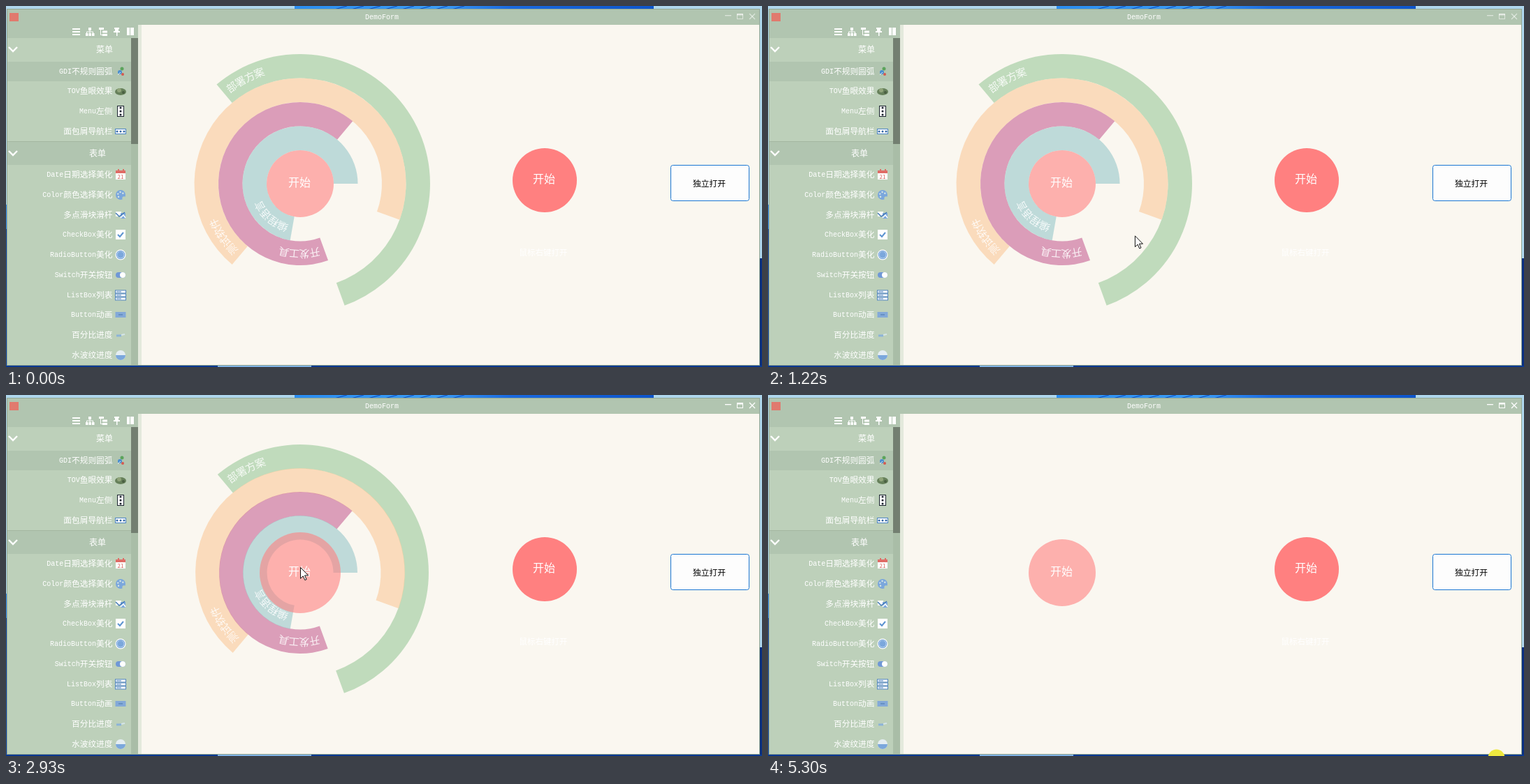
Animation, 1082 px wide and 518 px high, one loop 5350 ms. Source, as an HTML page with a canvas:

```html
<!DOCTYPE html>
<html lang="zh">
<head>
<meta charset="utf-8">
<title>DemoForm</title>
<style>
html, body { margin: 0; width: 100%; height: 100%; overflow: hidden; }
canvas { display: block; }
</style>
</head>
<body>
<canvas id="stage" width="1082" height="518"></canvas>
<script>
const W = 1082, H = 518, LOOP = 5350;
const CJK = '"Noto Sans CJK SC", "Noto Sans CJK", sans-serif';
const MONO = '"Liberation Mono", monospace';
const CREAM = '#faf7f0', SAGE = '#bdd0ba', SAGE_DARK = '#b1c5b0', BLUE = '#7ba7dc';
const stage = document.getElementById('stage').getContext('2d');
const backdrop = document.createElement('canvas');
backdrop.width = W;
backdrop.height = H;
let g = backdrop.getContext('2d');

function box(color, x, y, w, h) {
  g.fillStyle = color;
  g.fillRect(x, y, w, h);
}

function disc(color, x, y, r) {
  g.fillStyle = color;
  g.beginPath();
  g.arc(x, y, r, 0, 7);
  g.fill();
}

function line(color, width, ...pts) {
  g.strokeStyle = color;
  g.lineWidth = width;
  g.beginPath();
  for (let i = 0; i < pts.length; i += 2) g.lineTo(pts[i], pts[i + 1]);
  g.stroke();
}

function frame(color, x, y, w, h, width = 1) {
  g.strokeStyle = color;
  g.lineWidth = width;
  g.strokeRect(x, y, w, h);
}

function label(str, x, y, size, color = '#fff', align = 'center') {
  g.font = `${size}px ${CJK}`;
  g.textAlign = align;
  g.textBaseline = 'middle';
  g.fillStyle = color;
  g.fillText(str, x, y);
}

// Half-width Latin followed by full-width Chinese, set flush right.
function rowLabel(str, right, y) {
  const [, latin, han] = str.match(/^([A-Za-z]*)(.*)$/);
  label(han, right, y, 11.7, '#fff', 'right');
  const edge = right - g.measureText(han).width;
  g.font = `10px ${MONO}`;
  g.fillText(latin, edge, y);
}

function chevron(y) {
  line('#fff', 2.4, 4, y - 3, 10, y + 3, 16, y - 3);
}

// Each icon is drawn around its own centre.
const rows = [
  ['GDI不规则圆弧', 94, () => {
    disc('#5ba35c', 2, -4, 2.5);
    disc('#4a8fd0', -1, 1, 3);
    disc('#d35b52', 3, 4, 2);
    line('#dfe8f0', 1, -4, 5, 0, 1);
  }],
  ['TOV鱼眼效果', 122, () => {
    g.fillStyle = '#66805a';
    g.beginPath();
    g.ellipse(0, 1, 8, 5, 0, 0, 7);
    g.fill();
    disc('#91a57b', -2, -1, 3);
    disc('#4a5f42', 4, 2, 2);
  }],
  ['Menu左侧', 151, () => {
    box('#fff', -5, -8, 10, 16);
    frame('#1c2430', -4.5, -7.5, 9, 15);
    for (let y = -5; y < 7; y += 5) disc('#1c2430', 0, y, 1.5);
  }],
  ['面包屑导航栏', 180, () => {
    box('#fff', -8, -4, 16, 8);
    frame('#4b84c4', -7.5, -3.5, 15, 7);
    for (let x = -5; x < 7; x += 5) disc('#3569a8', x, 0, 1.5);
  }],
  ['Date日期选择美化', 242, () => {
    box('#fff', -7, -6, 14, 13);
    box('#df6c66', -7, -6, 14, 4);
    box('#df6c66', -4, -8, 2, 3);
    box('#df6c66', 3, -8, 2, 3);
    label('21', 0, 3, 8, '#d65f58');
  }],
  ['Color颜色选择美化', 271, () => {
    disc(BLUE, 0, 0, 7);
    for (let a = 2.4; a < 6.2; a += 1.1) disc('#d8e6e4', 4 * Math.cos(a), 4 * Math.sin(a), 1.2);
    disc(SAGE, 5, 5, 2.7);
  }],
  ['多点滑块滑杆', 300, () => {
    box('#fff', -7, -5, 8, 7);
    box(BLUE, 0, -3, 7, 8);
    line('#4278b5', 1.5, -7, -3, -2, 2, 6, -4);
    line('#fff', 1.5, 0, 4, 4, 0, 7, 4);
  }],
  ['CheckBox美化', 328, () => {
    box('#fff', -7, -7, 14, 14);
    line('#5d94d0', 2, -4, 0, -1, 3, 4, -3);
  }],
  ['RadioButton美化', 357, () => {
    disc('#fff', 0, 0, 7.5);
    disc('#6f9fd8', 0, 0, 6.3);
    disc('#d9e8f8', 0, 0, 5.3);
    disc(BLUE, 0, 0, 4.7);
  }],
  ['Switch开关按钮', 386, () => {
    line('#7098d6', 8, -3, 0, 3, 0);
    disc('#7098d6', -3, 0, 4);
    disc('#7098d6', 3, 0, 4);
    disc('#fff', 3, 0, 4);
  }],
  ['ListBox列表', 415, () => {
    for (let y = -7; y < 6; y += 5) {
      box('#fff', -7.5, y, 15, 4);
      frame('#4f83bf', -7.5, y, 15, 4);
      box('#4f83bf', -6, y + 1.5, 7, 1);
    }
  }],
  ['Button动画', 443, () => {
    box('#83a9d8', -7.5, -4, 15, 8);
    box('#6690c4', -3, -1, 6, 2);
  }],
  ['百分比进度', 472, () => {
    line('#8cb3d8', 3, -6, 1, 1, 1);
    line('#d5e5e8', 2, 1, 0, 6, -1);
  }],
  ['水波纹进度', 501, () => {
    disc('#e4edf2', 0, 0, 7);
    g.fillStyle = BLUE;
    g.beginPath();
    g.arc(0, 0, 7, 0, Math.PI);
    g.fill();
  }]
];

function drawDesktop() {
  box('#aed6ec', 0, 0, W, H);
  const sky = g.createLinearGradient(413, 0, 927, 0);
  sky.addColorStop(0, '#2a8df0');
  sky.addColorStop(0.4, '#3c9df5');
  sky.addColorStop(0.6, '#1a6ae0');
  sky.addColorStop(1, '#0d55cc');
  box(sky, 413, 0, 514, 5);
  for (let x = 470; x < 640; x += 24) line('#0b4fc0', 1.2, x, 5, x + 18, 0);
  box('#2a84ea', 0, 285, 2, 35);
  box('#0b3f9c', 0, 320, 2, 198);
  box('#0a2f80', 1079, 362, 3, 156);
  box('#0a3a92', 0, 516, W, 2);
  box('#7fb2e4', 303, 516, 134, 2);
}

function drawToolbar() {
  for (const y of [32, 36, 40]) box('#fff', 95, y, 11, 2);
  box('#fff', 118, 31, 4, 4);
  for (const x of [114, 118.5, 123]) box('#fff', x, 39, 3.5, 4);
  line('#fff', 1, 115.5, 39, 115.5, 37, 124.5, 37, 124.5, 39);
  line('#fff', 1, 120, 35, 120, 39);
  box('#fff', 133, 31, 7, 3);
  box('#fff', 138, 35.5, 7, 3);
  box('#fff', 138, 40, 7, 3);
  line('#fff', 1, 135.5, 34, 135.5, 41.5, 138, 41.5);
  box('#fff', 155, 31, 7, 2);
  box('#fff', 156, 32, 5, 5);
  box('#fff', 154, 36, 9, 2);
  box('#fff', 158, 38, 1.5, 5);
  box('#fff', 173, 31, 4, 11);
  box('#fff', 178, 31, 5, 11);
}

function drawSidebar() {
  box(SAGE, 2, 27, 177, 488);
  box(SAGE_DARK, 2, 27, 187, 19);
  box(SAGE_DARK, 2, 80, 177, 28);
  box(SAGE_DARK, 2, 194, 177, 34);
  line('#a3b6a1', 1, 2, 194.5, 179, 194.5);
  box('#a9bda7', 179, 46, 10, 469);
  box('#737f71', 179, 46, 10, 152);
  box('#e3e9dc', 189, 27, 5, 488);
  drawToolbar();
  chevron(62);
  chevron(211);
  label('菜单', 141, 62, 12);
  label('表单', 131, 211, 12);
  for (const [name, y, icon] of rows) {
    rowLabel(name, 152.5, y);
    g.save();
    g.translate(164, y);
    icon();
    g.restore();
  }
}

function drawBackdrop() {
  drawDesktop();
  box(CREAM, 1, 4, 1078, 512);
  box(SAGE_DARK, 1, 4, 1078, 23);
  drawSidebar();
  frame('#94a894', 1.5, 4.5, 1077, 511);
  box('#e17a6e', 5, 10, 13, 12);
  g.textAlign = 'center';
  g.textBaseline = 'middle';
  g.font = `10px ${MONO}`;
  g.fillStyle = '#fff';
  g.fillText('DemoForm', 538, 16);
  disc('#ff8080', 771, 250, 46);
  label('开始', 770, 248, 16);
  label('鼠标右键打开', 769, 354, 11.5);
  g.fillStyle = '#fdfdfd';
  g.strokeStyle = '#1976d2';
  g.lineWidth = 1;
  g.beginPath();
  g.roundRect(951.5, 228.5, 112, 51, 3);
  g.fill();
  g.stroke();
  label('独立打开', 1006.5, 255, 11.8, '#000');
}

// Interpolates rows of [time, value, ...] and returns the values.
function track(keys, t, ease = p => p * p * (3 - 2 * p)) {
  if (t <= keys[0][0]) return keys[0].slice(1);
  for (let i = 1; i < keys.length; i++) {
    const a = keys[i - 1], b = keys[i];
    if (t < b[0]) {
      const p = ease((t - a[0]) / (b[0] - a[0]));
      return a.slice(1).map((v, j) => v + (b[j + 1] - v) * p);
    }
  }
  return keys[keys.length - 1].slice(1);
}

const linear = p => p;
const cubic = p => p < 0.5 ? 4 * p ** 3 : 1 - 4 * (1 - p) ** 3;

const CX = 421, CY = 255, CORE = 48, STEP = 34.5;
const spread = [
  [1823, 1], [2286, 0], [2390, 0], [3030, 1], [3060, 1],
  [3510, 0], [3860, 0], [4108, 1], [4114, 1], [4572, 0]
];
const coreSwell = [[1560, 0], [1740, 10], [4420, 10], [4700, 0]];
const rings = [
  { text: '部署方案', rgb: '153,202,153', from: 230, sweep: 200,
    swell: [[890, 0], [980, 7], [1110, 0]] },
  { text: '测试软件', rgb: '250,202,153', from: 130, sweep: 250,
    swell: [[300, 0], [510, 14.5], [720, 14.5], [810, 9], [960, 0]] },
  { text: '开发工具', rgb: '198,99,148', from: 70, sweep: 240,
    swell: [[1290, 0], [1430, 14.5], [1520, 14.5], [1680, 0]] },
  { text: '编程语言', rgb: '150,200,202', from: 100, sweep: 260,
    swell: [[0, 0]] }
];
const pointer = [
  [70, 703, 434], [300, 590, 330], [540, 550, 295], [700, 550, 290], [810, 523, 279],
  [950, 578, 328], [1140, 561, 320], [1400, 445, 350], [1580, 437, 300],
  [1750, 433, 271], [2400, 433, 271], [2750, 421, 247], [3880, 421, 247],
  [4200, 441, 224], [4400, 441, 224], [4880, 1007, 508]
];

function drawRing(ring, level, open, t) {
  const outer = CORE + level * STEP * open;
  const inner = outer - STEP;
  const [swell] = track(ring.swell, t);
  const a0 = ring.from * Math.PI / 180;
  const a1 = a0 + ring.sweep * Math.PI / 180;
  g.fillStyle = `rgba(${ring.rgb},${0.6 * open})`;
  g.beginPath();
  g.arc(CX, CY, outer + swell, a0, a1);
  g.arc(CX, CY, Math.max(0, inner - swell), a1, a0, true);
  g.fill();

  const mid = (outer + inner) / 2;
  [...ring.text].forEach((ch, i) => {
    g.save();
    g.translate(CX, CY);
    g.rotate(a0 + (14 + 14.7 * i) / mid + Math.PI / 2);
    label(ch, 0, -mid - 1, 15, `rgba(255,255,255,${0.85 * open})`);
    g.restore();
  });
}

function drawMenu(t) {
  const [open] = track(spread, t, cubic);
  if (open > 0.002) rings.forEach((ring, i) => drawRing(ring, 4 - i, open, t));
  disc('rgba(255,128,128,0.59)', CX, CY, CORE + track(coreSwell, t)[0]);
  label('开始', 420, 253, 16);
}

function drawWindowButtons(active) {
  g.globalAlpha = active ? 1 : 0.55;
  box('#fff', 1029, 13, 9, 1.3);
  frame('#fff', 1046.5, 11.5, 8, 7);
  box('#fff', 1046, 11, 9, 2.5);
  line('#fff', 1.2, 1064, 11, 1072, 19);
  line('#fff', 1.2, 1072, 11, 1064, 19);
  g.globalAlpha = 1;
}

const arrow = new Path2D('M.5 .5V16.3L4.2 12.8L6.8 18.6L9.1 17.6L6.5 11.9H11.6Z');

function drawPointer(t) {
  if (t < 70 || t > 4870) return;
  const [x, y] = track(pointer, t, linear);
  g.save();
  g.translate(x, y);
  g.fillStyle = '#fff';
  g.strokeStyle = '#111';
  g.lineWidth = 1;
  g.fill(arrow);
  g.stroke(arrow);
  g.restore();
}

function render(t) {
  g.drawImage(backdrop, 0, 0);
  drawWindowButtons(t >= 1900);
  drawMenu(t);
  drawPointer(t);
  if (t >= 5300) disc('#eee83f', 1042.5, 520.5, 12);
}

const start = performance.now();
function tick() {
  render((performance.now() - start) % LOOP);
  requestAnimationFrame(tick);
}

drawBackdrop();
g = stage;
tick();
</script>
</body>
</html>
```
